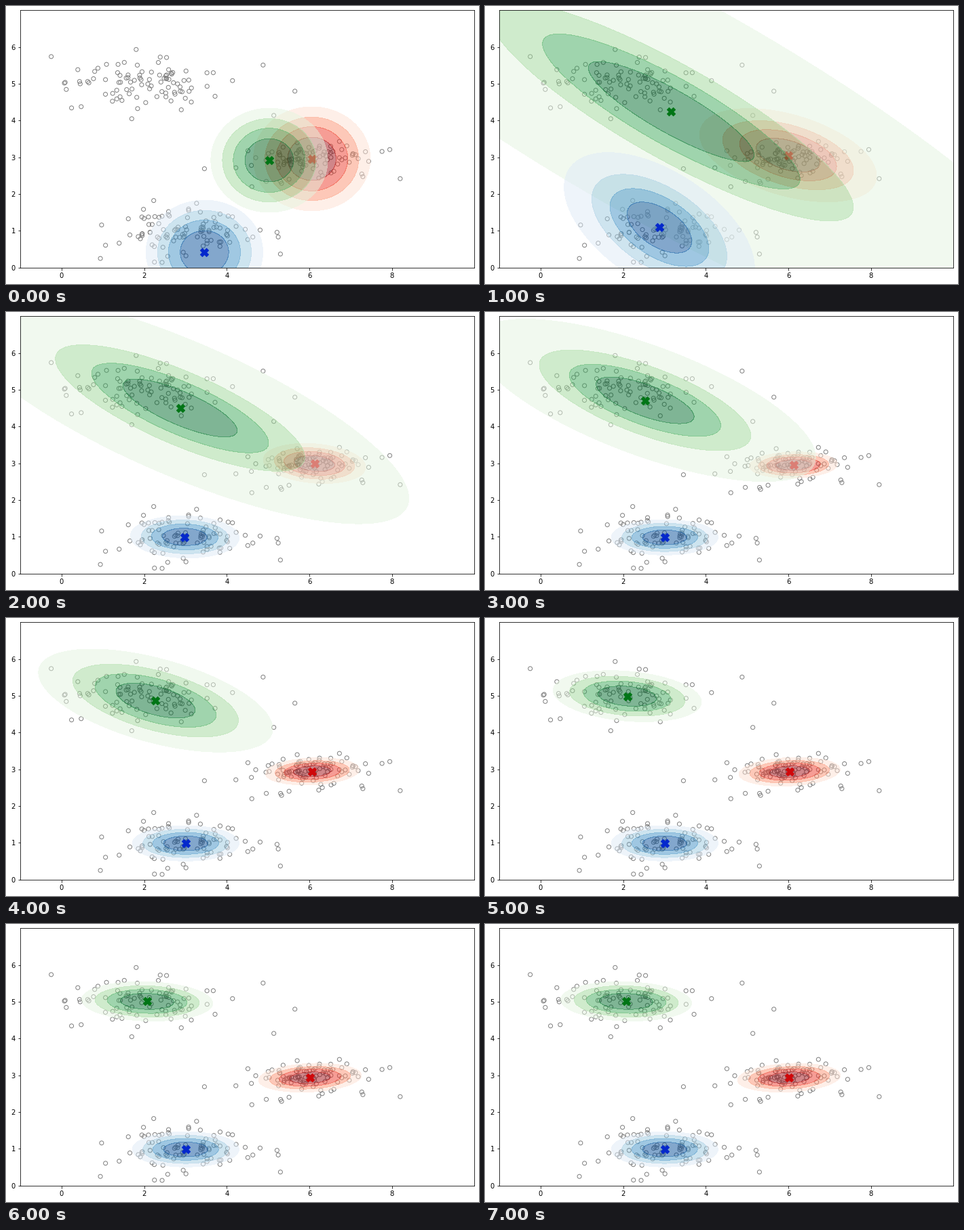
Recreate the animation shown at these times as a matplotlib script. Size 697 by 411 pixels, loop 8000 ms.

```python
import numpy as np
import matplotlib.pyplot as plt
from matplotlib.animation import FuncAnimation

W, H, DPI = 697, 411, 72
LEFT, BOTTOM, AX_W, AX_H = 21, 24.2, 669.4, 380.5
STEPS = 8

rng = np.random.default_rng(12)


def blob(count, mean, sd, rho=0):
    """Normal cloud whose sample mean, spread and correlation are exact."""
    x, y = rng.standard_normal((2, count))
    x = (x - x.mean()) / x.std()
    y -= y.mean()
    y -= (x * y).mean() * x
    y = rho * x + np.sqrt(1 - rho * rho) * y / y.std()
    return np.c_[mean[0] + sd[0] * x, mean[1] + sd[1] * y]


# Three clouds plus the most distant stray points.
strays = [(-0.25, 5.74), (4.88, 5.51), (5.65, 4.8), (5.14, 4.14), (1.7, 4.05),
          (8.2, 2.42), (3.46, 2.69), (7.76, 3.16),
          (5.3, 0.37), (0.94, 0.25), (0.97, 1.16), (3.27, 1.75)]
points = np.vstack([
    blob(92, (2.0, 5.02), (0.9, 0.33)),
    blob(95, (6.0, 2.94), (0.72, 0.25), 0.2),
    blob(95, (3.02, 0.99), (0.85, 0.32)),
    strays,
])


def density(x, y, mean, cov):
    (a, b), (_, c) = cov
    det = a * c - b * b
    u, v = x - mean[0], y - mean[1]
    q = (c * u * u - 2 * b * u * v + a * v * v) / det
    return np.exp(-q / 2) / (2 * np.pi * np.sqrt(det))


def fit(means, steps):
    """Expectation-maximisation; spreads are taken about the previous means."""
    means = np.array(means)
    covs = np.array([np.eye(2)] * len(means))
    weights = np.ones(len(means)) / len(means)
    states = []
    for _ in range(steps):
        states.append((means, covs))
        resp = np.array([w * density(*points.T, m, c)
                         for w, m, c in zip(weights, means, covs)])
        resp /= resp.sum(axis=0)
        total = resp.sum(axis=1)
        covs = np.array([(r[:, None] * (points - m)).T @ (points - m) / t
                         for r, m, t in zip(resp, means, total)])
        means = resp @ points / total[:, None]
        weights = total / len(points)
    return states


COLORS = ["red", "green", "blue"]
states = fit([(6.06, 2.96), (5.03, 2.92), (3.46, 0.42)], STEPS)

fig = plt.figure(figsize=(W / DPI, H / DPI), dpi=DPI, facecolor="white")
ax = fig.add_axes([LEFT / W, BOTTOM / H, AX_W / W, AX_H / H])
ax.set(xticks=range(0, 9, 2), yticks=range(7))
ax.scatter(*points.T, s=36, facecolors="none", edgecolors="gray",
           linewidths=1, zorder=1)
gx, gy = np.meshgrid(np.linspace(-1, 10, 480), np.linspace(0, 7, 320))
shown = []


def update(n):
    while shown:
        shown.pop().remove()
    for color, mean, cov in zip(COLORS, *states[n]):
        rho = cov[0, 1] / np.sqrt(cov[0, 0] * cov[1, 1])
        # Lowest level: the far corner of the one-sigma box.
        edge = np.exp(-1 / (1 - abs(rho)))
        z = density(gx, gy, mean, cov) / density(*mean, mean, cov)
        shown.append(ax.scatter(*mean, marker="X", s=150, color=color,
                                linewidths=1, zorder=2))
        shown.append(ax.contourf(gx, gy, z, levels=np.linspace(edge, 1, 5),
                                 cmap=color.title() + "s", alpha=0.5, zorder=2))
    ax.set(xlim=(-1, 10), ylim=(0, 7))
    return shown


anim = FuncAnimation(fig, update, frames=STEPS, init_func=lambda: [],
                     interval=1000, repeat=True, repeat_delay=0, blit=False)
plt.show()
```
